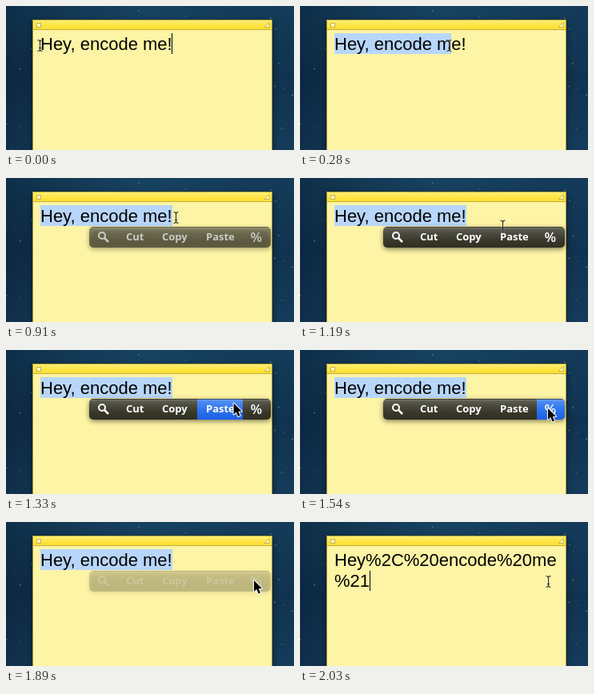
These frames come from a looping animation (360 px wide and 180 px high, 3740 ms). An HTML page with a canvas:

```html
<!DOCTYPE html>
<html lang="en">
<head>
<meta charset="utf-8">
<title>Encode selected text</title>
<style>
html, body { margin: 0; width: 100%; height: 100%; overflow: hidden; background: #12324e; }
canvas { display: block; width: 360px; height: 180px; }
</style>
</head>
<body>
<canvas id="stage" width="360" height="180"></canvas>
<script>
const ctx = document.getElementById('stage').getContext('2d');
const LOOP = 3740, STEP = 70;
const NOTE_FONT = '22px "Liberation Sans", Arial, sans-serif';
const MENU_FONT = 'bold 13px "Open Sans", sans-serif';
const PLAIN = 'Hey, encode me!';
const ENCODED = ['Hey%2C%20encode%20me', '%21'];
const TEXT_X = 43;
const MENU = { x: 104, y: 61, w: 227, h: 26, r: 5 };

const clamp = v => Math.max(0, Math.min(1, v));
const progress = (t, from, to) => clamp((t - from) / (to - from));
const mix = (a, b, k) => a + (b - a) * k;
const smooth = k => k * k * (3 - 2 * k);

function gradient(x0, y0, x1, y1, ...colors) {
  const g = ctx.createLinearGradient(x0, y0, x1, y1);
  colors.forEach((c, i) => g.addColorStop(i / (colors.length - 1), c));
  return g;
}

function box(x, y, w, h, fill) {
  ctx.fillStyle = fill;
  ctx.fillRect(x, y, w, h);
}

function poly(points) {
  ctx.beginPath();
  points.forEach(([x, y]) => ctx.lineTo(x, y));
  ctx.closePath();
}

function label(text, x, y, font, color) {
  ctx.font = font;
  ctx.fillStyle = color;
  ctx.fillText(text, x, y);
}

function drawSky() {
  box(0, 0, 360, 180, gradient(0, 0, 0, 180, '#133a57', '#0f304d', '#153a59'));
  box(0, 0, 360, 180, gradient(0, 0, 360, 0, 'rgba(4,20,38,.3)', 'rgba(40,100,135,.2)', 'rgba(20,65,95,.15)'));
  let seed = 29;
  const rand = () => (seed = (seed * 16807) % 2147483647) / 2147483647;
  for (let i = 0; i < 260; i++) {
    const x = rand() * 360, y = rand() * 180, bright = rand() ** 4;
    const size = 0.7 + bright * 0.7;
    box(x, y, size, size, `rgba(165,205,225,${0.12 + bright * 0.6})`);
  }
}

function drawNote() {
  ctx.save();
  ctx.shadowColor = 'rgba(0,0,0,.55)';
  ctx.shadowBlur = 8;
  ctx.shadowOffsetY = 3;
  box(33, 17, 300, 180, '#a8943a');
  ctx.restore();
  box(34, 30, 298, 150, '#fdf4a5');
  box(34, 18, 298, 11, gradient(0, 18, 0, 29, '#fff07a', '#fee545', '#fddf35'));
  box(33, 17, 300, 1, '#b59d28');
  box(34, 29, 298, 1, '#c4ac35');
  // title bar buttons
  box(38, 21, 6, 6, '#c9b240');
  box(39, 22, 4, 4, '#fffbd8');
  poly([[329, 20.5], [329, 26.5], [323, 26.5]]);
  ctx.fillStyle = '#fffbd8';
  ctx.fill();
  ctx.strokeStyle = '#c9b240';
  ctx.lineWidth = 1;
  ctx.stroke();
}

function textEdge(count) {
  ctx.font = NOTE_FONT;
  return TEXT_X + ctx.measureText(PLAIN.slice(0, count)).width;
}

// right edge of the selection, snapped to the nearest letter gap
function selectionEnd(x) {
  let best = TEXT_X;
  for (let i = 1; i <= PLAIN.length; i++) {
    const edge = textEdge(i);
    if (Math.abs(edge - x) < Math.abs(best - x)) best = edge;
  }
  return Math.round(best);
}

function drawText(t, pointer) {
  if (t >= 1960) {
    ENCODED.forEach((line, i) => label(line, TEXT_X, 55 + 26 * i, NOTE_FONT, '#000'));
    box(87, 61, 1, 25, '#000');
    return;
  }
  if (t >= STEP) box(TEXT_X, 34, selectionEnd(pointer.x) - TEXT_X, 26, '#b8d6fb');
  label(PLAIN, TEXT_X, 55, NOTE_FONT, '#000');
  if (t < STEP) box(207, 34, 1, 26, '#000');
}

function menuAlpha(t) {
  if (t < 1750) return progress(t, 770, 980);
  return 0.65 * (1 - progress(t, 1750, 1960));
}

function drawMenu(t, pointer) {
  const alpha = menuAlpha(t);
  if (!alpha) return;
  const { x, y, w, h, r } = MENU;
  ctx.save();
  ctx.globalAlpha = alpha;
  ctx.beginPath();
  ctx.roundRect(x, y, w, h, r);
  ctx.save();
  ctx.shadowColor = 'rgba(0,0,0,.5)';
  ctx.shadowBlur = 6;
  ctx.shadowOffsetY = 2;
  ctx.fillStyle = gradient(0, y, 0, y + h, '#67665a', '#4a493e', '#383729', '#302f24');
  ctx.fill();
  ctx.restore();
  ctx.save();
  ctx.clip();
  if (t < 1750 && overMenu(t, pointer)) {
    const [left, right] = pointer.x >= 296 ? [296, 331] : [239, 296];
    box(left, y, right - left, h, gradient(0, y, 0, y + h, '#5b94f4', '#2f74ef', '#1d60e4'));
  }
  box(x, y, w, 1, 'rgba(30,30,22,.6)');
  box(x, y + 1, w, 1, 'rgba(255,255,255,.14)');
  ctx.restore();

  ctx.strokeStyle = '#fff';
  ctx.lineWidth = 2;
  ctx.beginPath();
  ctx.arc(120, 72, 4, 0, Math.PI * 2);
  ctx.stroke();
  ctx.lineWidth = 2.6;
  ctx.beginPath();
  ctx.moveTo(123.2, 75.2);
  ctx.lineTo(128, 80);
  ctx.stroke();
  label('Cut', 150, 78, MENU_FONT, '#fff');
  label('Copy', 195, 78, MENU_FONT, '#fff');
  label('Paste', 250, 78, MENU_FONT, '#fff');
  label('%', 305.5, 80, '600 17px "Open Sans", sans-serif', '#fff');
  ctx.restore();
}

function pointerAt(t) {
  if (t < 770) {
    const k = 1 - (1 - progress(t, 0, 490)) ** 2.2;
    return { x: mix(42, 212, k), y: 49 };
  }
  const k = smooth(progress(t, 910, 1540));
  return { x: mix(212, 310, k), y: mix(49, 74, k) };
}

const overMenu = (t, p) => t >= 910 && t < 2030 && p.y > MENU.y;

function drawBeam(x, y) {
  ctx.beginPath();
  for (const s of [-1, 1]) {
    ctx.moveTo(x - 3, y + 7 * s);
    ctx.quadraticCurveTo(x, y + 7 * s, x, y + 4.5 * s);
    ctx.quadraticCurveTo(x, y + 7 * s, x + 3, y + 7 * s);
  }
  ctx.moveTo(x, y - 5);
  ctx.lineTo(x, y + 5);
  ctx.moveTo(x - 1.5, y + 3);
  ctx.lineTo(x + 1.5, y + 3);
  ctx.strokeStyle = 'rgba(255,255,255,.35)';
  ctx.lineWidth = 2.4;
  ctx.stroke();
  ctx.strokeStyle = '#2b2a20';
  ctx.lineWidth = 1.1;
  ctx.stroke();
}

function drawArrow(x, y) {
  ctx.save();
  ctx.translate(x, y);
  poly([[0, 0], [0, 14], [3.2, 11], [5.6, 16.5], [8, 15.5], [5.7, 10.2], [10, 10]]);
  ctx.lineJoin = 'round';
  ctx.strokeStyle = '#fff';
  ctx.lineWidth = 2;
  ctx.stroke();
  ctx.fillStyle = '#000';
  ctx.fill();
  ctx.restore();
}

function draw(now) {
  const t = Math.floor((now % LOOP) / STEP) * STEP;
  const pointer = pointerAt(t);
  drawSky();
  drawNote();
  drawText(t, pointer);
  drawMenu(t, pointer);
  if (overMenu(t, pointer)) drawArrow(pointer.x, pointer.y - 1);
  else drawBeam(Math.round(pointer.x) + 0.5, pointer.y + 0.5);
}

const start = performance.now();
function tick() {
  draw(performance.now() - start);
  requestAnimationFrame(tick);
}
tick();
</script>
</body>
</html>
```
